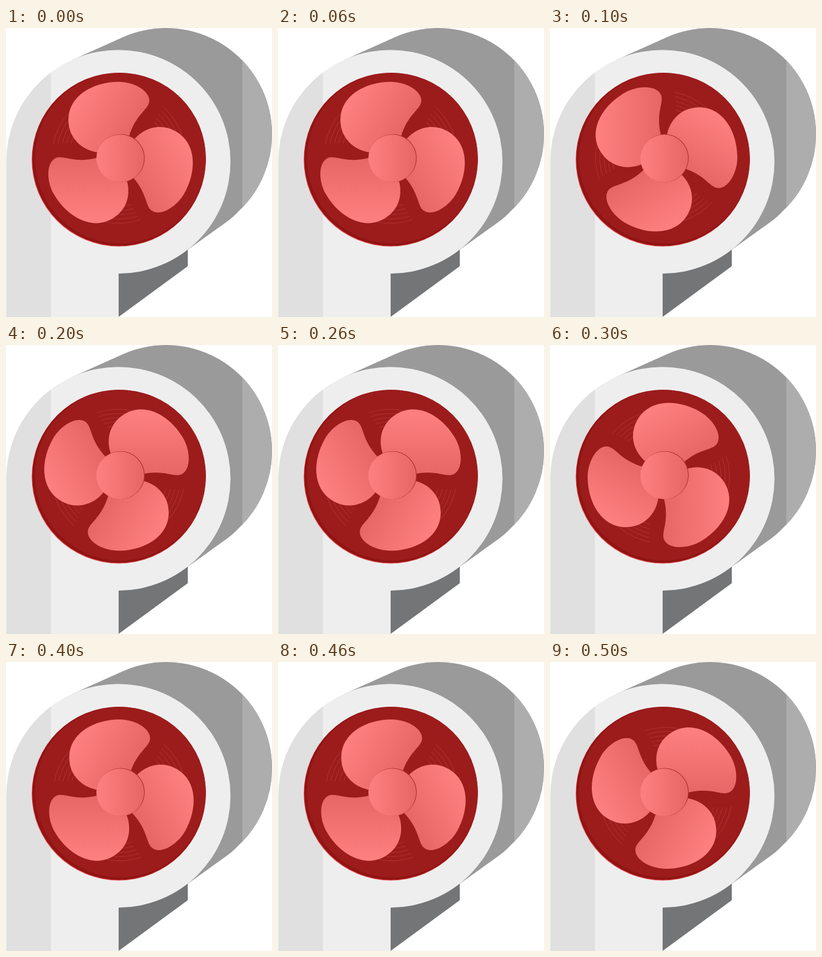
Recreate the animation shown at these times as an HTML page. Size 439x478 px, loop 600 ms.

```html
<!DOCTYPE html>
<html lang="en">
<head>
<meta charset="utf-8">
<title>Fan</title>
<style>
  html, body { margin: 0; width: 100%; height: 100%; overflow: hidden; background: #fff; }
  svg { display: block; width: 439px; height: 478px; }
</style>
</head>
<body>
<svg viewBox="0 0 439 478">
  <defs>
    <linearGradient id="bladeFill" gradientUnits="userSpaceOnUse" x1="186" y1="213" x2="91" y2="158">
      <stop offset="0" stop-color="#e66666"/>
      <stop offset="1" stop-color="#ff8080"/>
    </linearGradient>
    <linearGradient id="hubFill">
      <stop offset="0" stop-color="#ff8080"/>
      <stop offset="1" stop-color="#e66666"/>
    </linearGradient>
    <path id="drum" d="M110 52.4L192.3 15.4A175 175 0 0 1 439 175.5A175 175 0 0 1 384 303
      Q375 313 363 321.5L296.8 369.1Z"/>
    <path id="body" d="M.5 478V221.2A185 185 0 1 1 185.6 406.2V478Z"/>
    <clipPath id="drumClip"><use href="#drum"/></clipPath>
    <clipPath id="bodyClip"><use href="#body"/></clipPath>
    <path id="blade" fill="url(#bladeFill)" d="M186 213L155 206C128 204 103 184 103 152
      C103 112 144 89 186 89C210 89 236.5 103 236.5 120C236.5 135 214 141 202.5 181Z"/>
    <g id="streaks" fill="none" stroke="#c04a4a" stroke-width=".8" stroke-opacity=".6"></g>
  </defs>

  <use href="#drum" fill="#9a9a9a"/>
  <rect x="390" width="49" height="478" fill="#adadad" clip-path="url(#drumClip)"/>
  <path d="M185.6 400L300 360V394L185.6 478Z" fill="#737577"/>
  <use href="#body" fill="#eee"/>
  <rect width="74" height="478" fill="#e0e0e0" clip-path="url(#bodyClip)"/>

  <circle cx="186" cy="217.9" r="143.6" fill="#ee5a5a"/>
  <circle cx="186.5" cy="217.2" r="143.3" fill="#911414"/>
  <circle cx="188.7" cy="215.3" r="141" fill="#9c1c1c"/>

  <g id="fan"></g>

  <circle cx="189.3" cy="215.2" r="39.7" fill="#a83030"/>
  <circle cx="188.5" cy="215.7" r="39.4" fill="url(#hubFill)"/>
</svg>
<script>
  const byId = id => document.getElementById(id);
  const fan = byId('fan');
  const cx = 186.3, cy = 212.9; // blade centre, slightly off the pivot

  const polar = (r, deg) => {
    const a = deg * Math.PI / 180;
    return `${cx + r * Math.cos(a)} ${cy + r * Math.sin(a)}`;
  };

  let arcs = '';
  for (let r = 82; r <= 110; r += 7) {
    const start = 71 + (110 - r) * .17;
    arcs += `<path d="M${polar(r, start)}A${r} ${r} 0 0 1 ${polar(r, 101)}"/>`;
  }
  byId('streaks').innerHTML = arcs;

  fan.innerHTML = ['streaks', 'blade'].map(part =>
    [0, 120, 240].map(turn =>
      `<use href="#${part}" transform="rotate(${turn} ${cx} ${cy})"/>`).join('')).join('');

  // Even 30 degree steps, with a double step at the end of the loop
  function draw(now) {
    const step = Math.floor(now / 100) % 6;
    const angle = step < 5 ? -30 * step : -180;
    fan.setAttribute('transform', `rotate(${angle} 188.7 215.5)`);
    requestAnimationFrame(draw);
  }
  draw(0);
</script>
</body>
</html>
```
